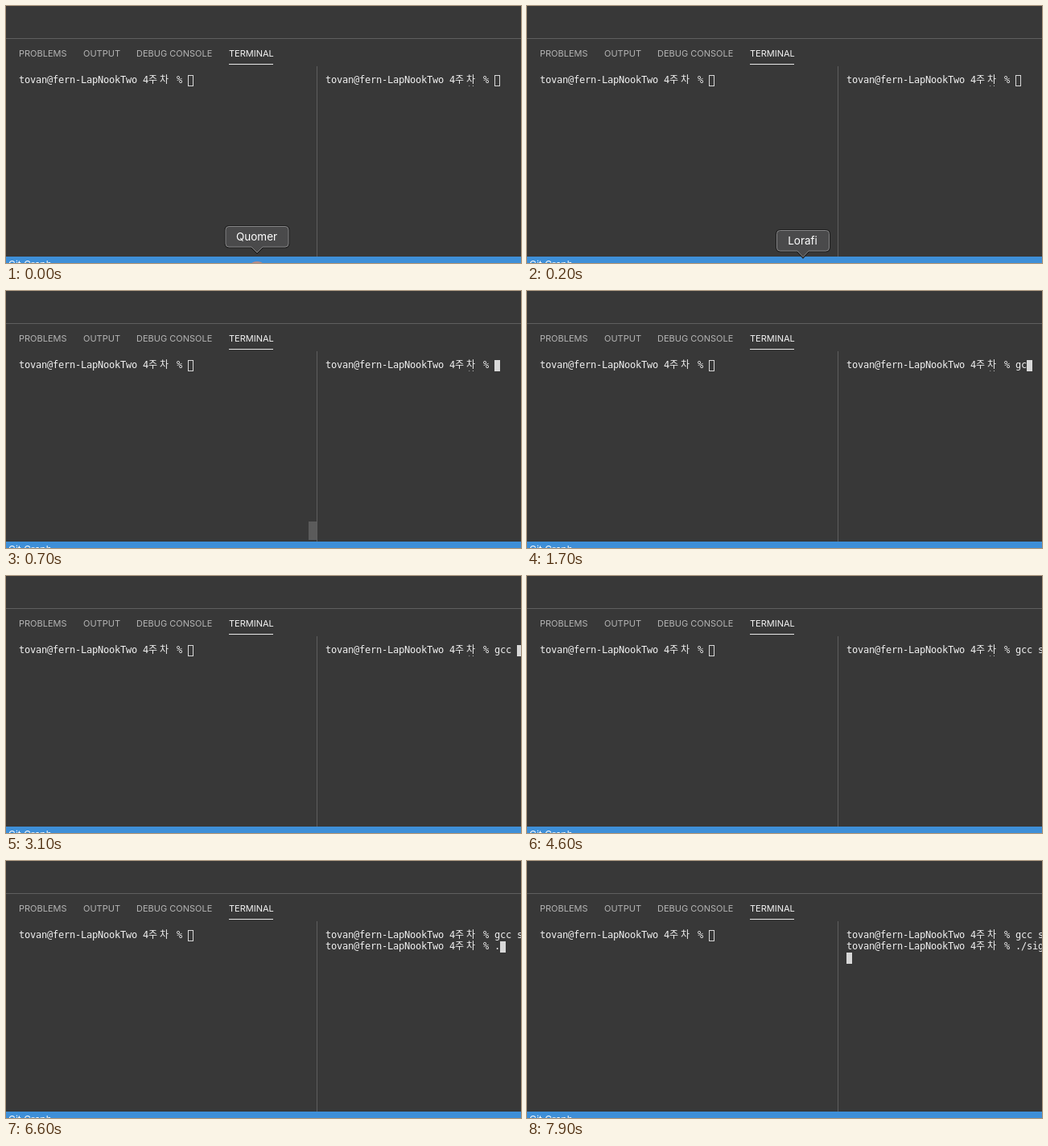
Animation, 640 px wide and 320 px high, one loop 8 s. Source, as an HTML page:

```html
<!DOCTYPE html>
<html lang="en">
<head>
<meta charset="utf-8">
<title>Terminal</title>
<style>
  html, body { margin: 0; width: 100%; height: 100%; overflow: hidden; background: #383838; }
  svg { display: block; width: 640px; height: 320px; }
  text { white-space: pre; }

  .tabs { font: 11px Inter, sans-serif; fill: #b4b4b4; }
  .tabs .active { fill: #f4f4f4; }
  .mono { font: 12px "DejaVu Sans Mono", monospace; letter-spacing: -.224px; fill: #f0f0f0; }
  .hangul { font: 12px "Noto Sans CJK KR", "Noto Sans CJK", sans-serif; letter-spacing: 0; }
  .status { font: 12px Inter, sans-serif; fill: #fff; }
  .tip text { font: 13.5px Inter, sans-serif; fill: #fff; text-anchor: middle; }
  .tip path { fill: #4a4a4b; stroke: #858586; }
  .tip .edge { fill: none; stroke: #1e1e1e; stroke-width: 3; }
  .cover { fill: #383838; }

  .step { animation: 8s step-end -20ms infinite; }
  .first-tip { animation-name: first-tip; }
  .second-tip { animation-name: second-tip; }
  .scrollbar { animation-name: scrollbar; }
  .cursor { animation-name: cursor; }
  .block { stroke: #d8d8d8; animation-name: focus; }

  @keyframes first-tip { 0% { opacity: 1 } 1.25%, 100% { opacity: 0 } }
  @keyframes second-tip {
    0% { opacity: 0; transform: translateY(-3px) }
    1.25% { opacity: 1; transform: translateY(-3px) }
    2.5% { opacity: 1; transform: none }
    3.75%, 100% { opacity: 0; transform: none }
  }
  @keyframes scrollbar { 0% { opacity: 0 } 6.25% { opacity: 1 } 12.5%, 100% { opacity: 0 } }
  @keyframes focus { 0% { fill: transparent } 7.5%, 100% { fill: #d8d8d8 } }
  @keyframes cursor {
    0% { transform: translate(607px, 86px) }
    16.25% { transform: translate(614px, 86px) }
    20% { transform: translate(621px, 86px) }
    22.5% { transform: translate(628px, 86px) }
    25% { transform: translate(635px, 86px) }
    40% { transform: translate(642px, 86px) }
    77.5% { transform: translate(397px, 100px) }
    80% { transform: translate(607px, 100px) }
    82.5% { transform: translate(614px, 100px) }
    85% { transform: translate(621px, 100px) }
    87.5% { transform: translate(628px, 100px) }
    88.75% { transform: translate(635px, 100px) }
    90% { transform: translate(642px, 100px) }
    96.25%, 100% { transform: translate(397px, 114px) }
  }
</style>
</head>
<body>
<svg viewBox="0 0 640 320">
  <defs>
    <g id="prompt">
      <text class="mono">tovan@fern-LapNookTwo 4</text>
      <text class="mono hangul" x="161">주</text>
      <text class="mono hangul" x="175">차</text>
      <text class="mono" x="196">%</text>
    </g>
  </defs>

  <rect width="640" height="320" fill="#383838"/>

  <!-- Right pane: the cursor carries a cover that hides text not yet typed. -->
  <use href="#prompt" x="397" y="96"/>
  <text class="mono" x="607" y="96">gcc s</text>
  <use href="#prompt" x="397" y="110"/>
  <text class="mono" x="607" y="110">./sig</text>
  <g class="step cursor">
    <rect class="cover" width="260" height="14"/>
    <rect class="cover" x="-245" y="14" width="505" height="14"/>
    <rect class="step block" x=".5" y=".5" width="6" height="13"/>
  </g>

  <!-- Left pane -->
  <use href="#prompt" x="16" y="96"/>
  <rect x="226.5" y="86.5" width="6" height="13" fill="none" stroke="#d8d8d8"/>
  <rect class="step scrollbar" x="376" y="287" width="10" height="23" fill="#5b5b5b"/>

  <path d="M0 40.5H640M386.5 75V312" stroke="#5e5e5e"/>
  <g class="tabs">
    <text x="16" y="63">PROBLEMS</text>
    <text x="96" y="63">OUTPUT</text>
    <text x="162" y="63">DEBUG CONSOLE</text>
    <text x="277" y="63" class="active">TERMINAL</text>
  </g>
  <path d="M277 72.5H332" stroke="#e7e7e7"/>

  <rect y="312" width="640" height="8" fill="#3e8fd8"/>
  <text class="status" x="3" y="326">Git Graph</text>

  <!-- Dock labels -->
  <g class="step first-tip">
    <circle cx="312" cy="331" r="13" fill="#b98a86"/>
    <g class="tip">
      <path class="edge" d="M277 274.500H347a4 4 0 0 1 4 4V296a4 4 0 0 1-4 4H319L312 307L305 300H277a4 4 0 0 1-4-4V278.500a4 4 0 0 1 4-4Z"/>
      <path d="M277 274.500H347a4 4 0 0 1 4 4V296a4 4 0 0 1-4 4H319L312 307L305 300H277a4 4 0 0 1-4-4V278.500a4 4 0 0 1 4-4Z"/>
      <text x="311.500" y="292">Quomer</text>
    </g>
  </g>
  <g class="step second-tip tip">
    <path class="edge" d="M314.500 279.500H371.500a4 4 0 0 1 4 4V301a4 4 0 0 1-4 4H350L343 312.500L336 305H314.500a4 4 0 0 1-4-4V283.500a4 4 0 0 1 4-4Z"/>
    <path d="M314.500 279.500H371.500a4 4 0 0 1 4 4V301a4 4 0 0 1-4 4H350L343 312.500L336 305H314.500a4 4 0 0 1-4-4V283.500a4 4 0 0 1 4-4Z"/>
    <text x="342.500" y="297">Lorafi</text>
  </g>
</svg>
</body>
</html>
```
